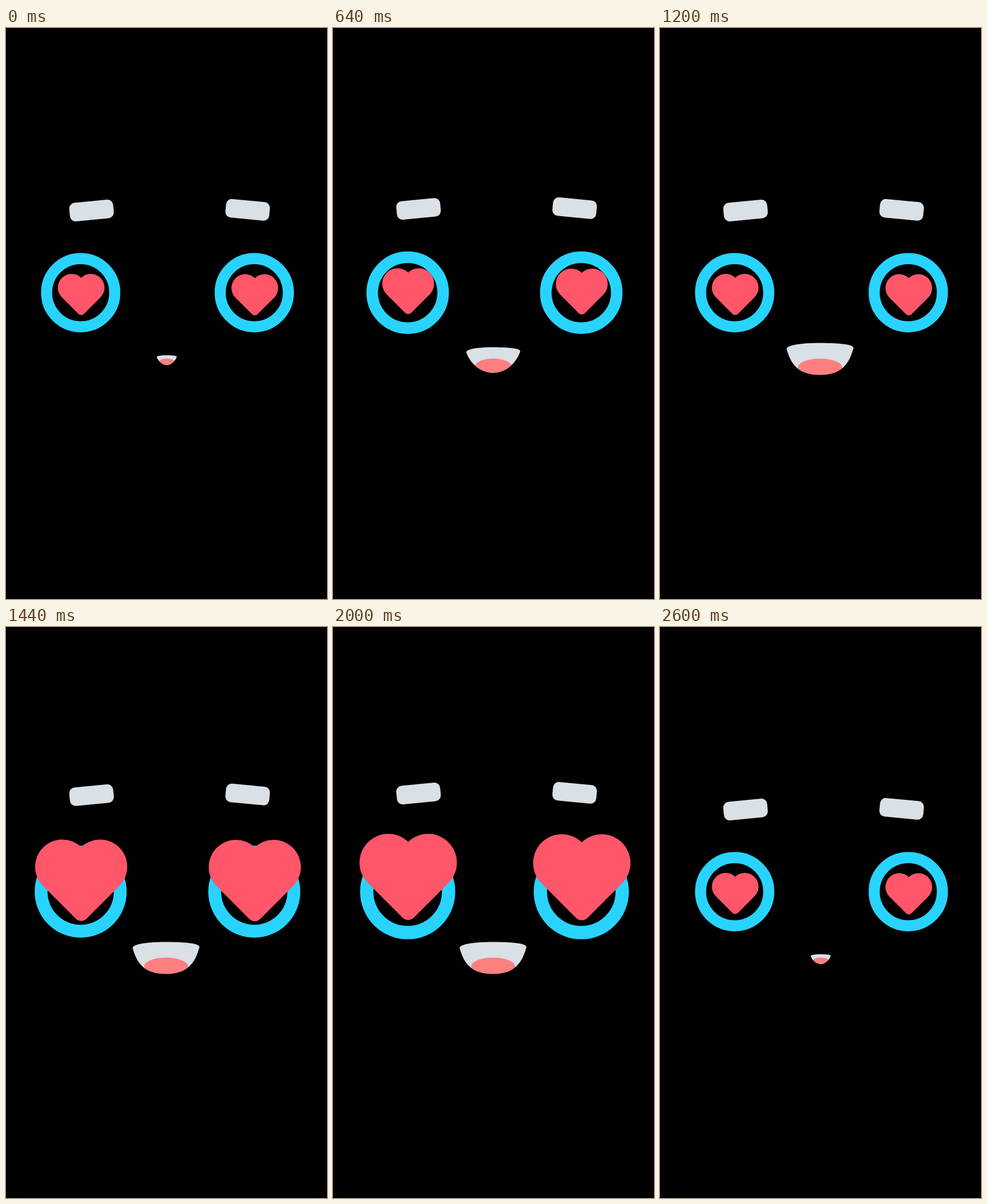
These frames come from a looping animation (561 px wide and 998 px high, 2760 ms). An HTML page:

```html
<!DOCTYPE html>
<html lang="en">
<head>
<meta charset="utf-8">
<title>Heart eyes</title>
<style>
  html, body { margin: 0; width: 100%; height: 100%; overflow: hidden; background: #000; }
  svg { display: block; width: 100%; height: 100%; }
  .light { fill: #d9e0e6; }
  .ring { fill: none; stroke: #28d4ff; stroke-width: 19.4; }
  .heart { fill: #ff566a; }
  .tongue { fill: #ff7f7f; }
</style>
</head>
<body>
<svg viewBox="0 0 561 998">
  <defs>
    <rect id="brow" x="-38.5" y="-16.25" width="77" height="32.5" rx="10"/>
    <circle id="ring" r="59.6"/>
    <path id="heart"/>
    <clipPath id="lips"><path class="mouth"/></clipPath>
  </defs>
  <use href="#brow" class="light brow"/>
  <use href="#brow" class="light brow"/>
  <use href="#ring" class="ring"/>
  <use href="#ring" class="ring"/>
  <use href="#heart" class="heart"/>
  <use href="#heart" class="heart"/>
  <path class="light mouth"/>
  <g clip-path="url(#lips)"><ellipse class="tongue"/></g>
</svg>
<script>
const LOOP = 2760, STEP = 40, BEAT = 600, PULSE = 400, LAST_BEAT = 2400;

const all = sel => [...document.querySelectorAll(sel)];
const brows = all('.brow'), rings = all('.ring'), hearts = all('.heart'), mouths = all('.mouth');
const tongue = document.querySelector('.tongue');

const ease = x => x * x * (3 - 2 * x);
const mix = (a, b, p) => a + (b - a) * p;

// Two round lobes meeting in a square corner with a rounded tip
function heartPath(r, lobeX, lobeY, tip) {
  const k = Math.SQRT1_2, notch = lobeY - Math.sqrt(r * r - lobeX * lobeX);
  const sideX = lobeX + r * k, sideY = lobeY + r * k;
  const tipX = tip * k, tipY = sideY + sideX - tipX;
  return `M0 ${notch}A${r} ${r} 0 0 0 ${-sideX} ${sideY}L${-tipX} ${tipY}` +
    `A${tip} ${tip} 0 0 0 ${tipX} ${tipY}L${sideX} ${sideY}A${r} ${r} 0 0 0 0 ${notch}Z`;
}
document.querySelector('#heart').setAttribute('d', heartPath(24.1, 16.65, -12.3, 6.8));

const pose = (half, top, height, full) => ({ half, top, height, full });
const blend = (a, b, p) => pose(...Object.keys(a).map(k => mix(a[k], b[k], p)));

const closed = pose(17.5, 571.9, 17.3, 0.48);
const wide = pose(72.8, 548.1, 67.7, 0.45);
const smile = pose(58.3, 550.5, 55.8, 0.76);

const mouthKeys = [
  [0, closed], [440, wide], [760, blend(closed, smile, 0.433)],
  [1200, smile], [2360, smile], [2600, closed], [LOOP, closed]
];

function mouthAt(t) {
  const i = mouthKeys.findIndex(k => k[0] > t);
  const [t0, a] = mouthKeys[i - 1], [t1, b] = mouthKeys[i];
  return blend(a, b, ease((t - t0) / (t1 - t0)));
}

function drawMouth({ half, top, height, full }) {
  const cx = 281.5 - half * 0.03;
  const at = (x, y) => `${cx + x * half} ${top + y * height} `;
  const left = at(-1, 0.2), right = at(1, 0.17);
  const d = `M${left}C${at(-1.02, 0.1)}${at(-0.75, 0)}${at(0, 0)}S${at(1.02, 0.07)}${right}` +
    `C${at(0.9, 0.5)}${at(full, 1)}${at(0, 1)}S${at(-0.9, 0.53)}${left}Z`;
  mouths.forEach(el => el.setAttribute('d', d));

  const tongueTop = 577.8, ry = (top + height * 1.04 - tongueTop) / 2;
  const shape = { cx, cy: tongueTop + ry, rx: 3.5 + half * 0.6, ry };
  for (const name in shape) tongue.setAttribute(name, shape[name]);
}

// Linear rise and fall, 0 to 1 to 0
function pulseAt(t) {
  const phase = t % BEAT;
  if (t >= LAST_BEAT || phase >= PULSE) return 0;
  return 1 - Math.abs(phase * 2 / PULSE - 1);
}

function place(el, x, y, scale, angle = 0) {
  el.setAttribute('transform', `translate(${x} ${y}) rotate(${angle}) scale(${scale})`);
}

function draw(t) {
  const lift = pulseAt(t), grow = ease(lift);
  [0, 1].forEach(i => {
    const eyeX = 130.5 + 303.4 * i;
    place(brows[i], 149.5 + 272.8 * i, 319 - 1.2 * i - 28 * grow, 1, 11 * i - 5.5);
    place(rings[i], eyeX, 462.6, 1 + 0.2 * lift);
    place(hearts[i], eyeX + 0.9, 466.1 + 0.6 * i - 28.5 * lift, 1 + 1.088 * grow);
  });
  drawMouth(mouthAt(t));
}

const start = performance.now();
function tick() {
  const t = (performance.now() - start) % LOOP;
  draw(Math.floor(t / STEP) * STEP);
  requestAnimationFrame(tick);
}
tick();
</script>
</body>
</html>
```
